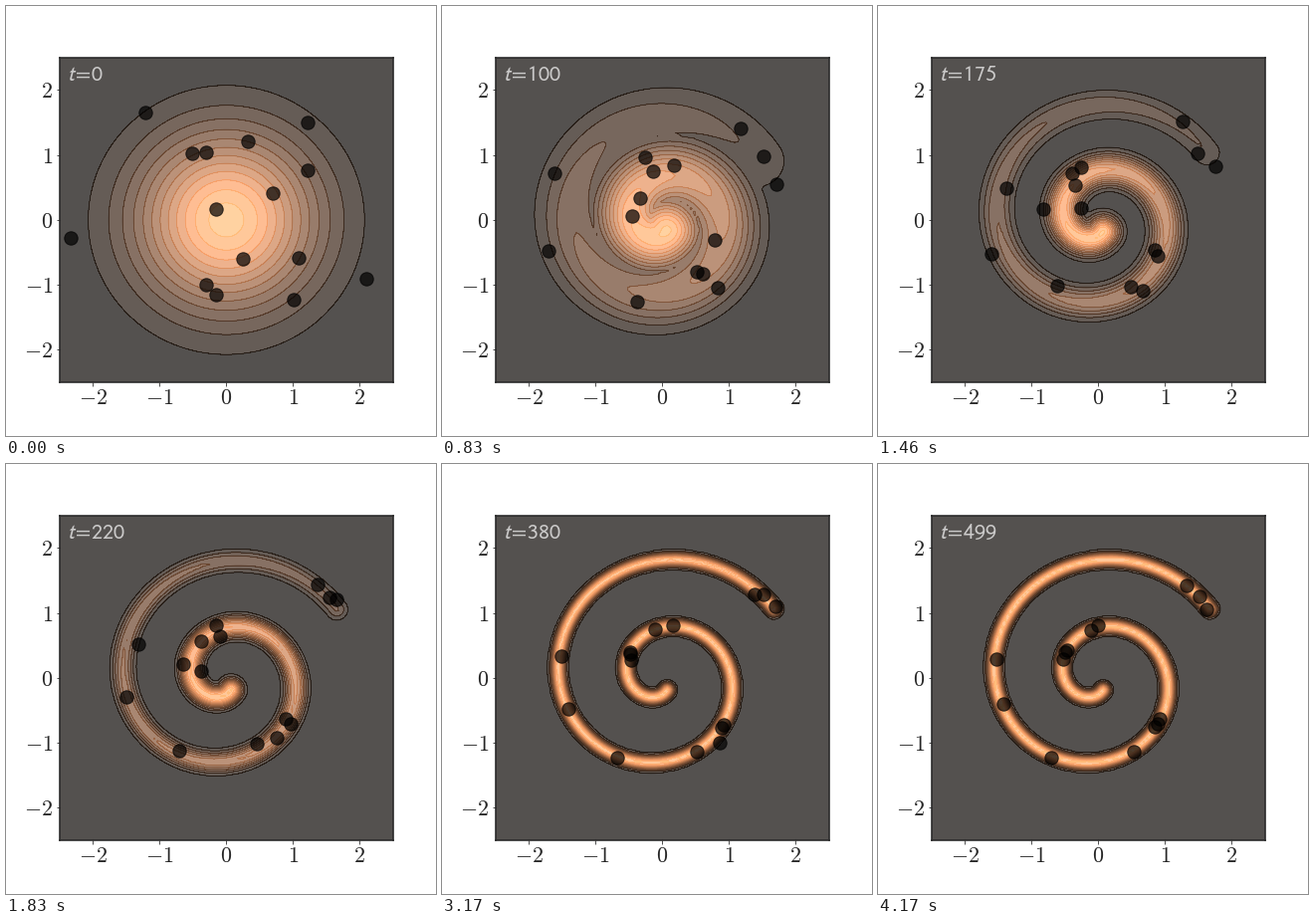
A matplotlib script that plays this animation: 432 by 432 pixels, repeating every 4.21 s.

```python
import numpy as np
import matplotlib.pyplot as plt
from matplotlib.animation import FuncAnimation

plt.rcParams["mathtext.fontset"] = "cm"

POSES, LOOP_MS = 101, 4210
SUBFRAMES = 2
STEPS = 500
INK = "0.15"
ALPHA = 0.7

# Spiral target and Gaussian prior
PITCH, PHI_MIN, PHI_MAX = 0.165, 1.2, 12.0
SHARPNESS = 105.0
PRIOR_VAR = 0.85

# Each walker: starting x, y and the spiral angle it settles at
WALKERS = np.array([
    (-1.21, 1.66, 9.65), (1.22, 1.50, 11.80), (0.33, 1.21, 4.76),
    (-0.52, 1.03, 3.90), (-0.30, 1.04, 4.59), (1.22, 0.76, 12.0),
    (0.69, 0.41, 6.91), (-0.15, 0.17, 3.70), (-2.33, -0.28, 9.13),
    (0.25, -0.60, 7.43), (1.09, -0.58, 7.00), (-0.31, -1.00, 3.80),
    (-0.15, -1.15, 8.39), (1.01, -1.23, 7.07), (2.10, -0.90, 11.84),
])


def spiral(phi):
    r = PITCH * phi
    return r * np.cos(phi), -r * np.sin(phi)


def mix(step):
    """Weight of the spiral against the prior."""
    return min(1, step / 50) / (1 + np.exp(5.9 - 0.025 * step))


def walk(rng):
    """Walker positions for every pose: a pull to the spiral plus cooling jitter."""
    start = WALKERS[:, :2]
    goal = np.column_stack(spiral(WALKERS[:, 2]))
    jitter = np.zeros_like(start)
    path = []
    for pose in range(POSES):
        step = 5 * pose
        pull = np.tanh(step / 130)
        path.append(start + (goal - start) * pull + jitter)
        heat = 0.02 + 0.06 * (1 - mix(step))
        jitter = 0.85 * jitter + rng.normal(0, heat, start.shape)
    return path


def spiral_dist2(x, y):
    best = np.full(x.shape, np.inf)
    for phi in np.linspace(PHI_MIN, PHI_MAX, 700):
        sx, sy = spiral(phi)
        np.minimum(best, (x - sx) ** 2 + (y - sy) ** 2, out=best)
    return best


axis = np.linspace(-2.5, 2.5, 100)
gx, gy = np.meshgrid(axis, axis)
prior = (gx**2 + gy**2) / (2 * PRIOR_VAR)
target = SHARPNESS * spiral_dist2(gx, gy)
path = walk(np.random.default_rng(4))

fig, ax = plt.subplots(figsize=(6, 6), dpi=72)
fig.subplots_adjust(left=0.125, right=0.9, bottom=0.125, top=0.88)
ticks = range(-2, 3)
labels = [f"${v}$" for v in ticks]
ax.set_xticks(ticks, labels)
ax.set_yticks(ticks, labels)
ax.tick_params(labelsize=22, color=INK, labelcolor=INK)
ax.tick_params(axis="x", pad=2.7)
for spine in ax.spines.values():
    spine.set(linewidth=1.6, edgecolor=INK)

dots = ax.scatter(*path[0].T, s=180, color="black", alpha=ALPHA, zorder=3)
label = ax.text(-2.4, 2.15, "", fontsize=22, color="white", alpha=ALPHA,
                zorder=4, math_fontfamily="stixsans")
layers = []
shown = None


def draw(frame):
    global shown
    pose = min((frame + 1) // SUBFRAMES, POSES - 1)
    if pose != shown:
        shown = pose
        step = min(5 * pose, STEPS - 1)
        while layers:
            layers.pop().remove()
        w = mix(step)
        density = np.exp(-(1 - w) * prior - w * target)
        style = dict(levels=14, cmap="copper", alpha=ALPHA)
        layers.append(ax.contourf(gx, gy, density, **style))
        layers.append(ax.contour(gx, gy, density, linewidths=0.7, **style))
        ax.set(xlim=(-2.5, 2.5), ylim=(-2.5, 2.5))
        dots.set_offsets(path[pose])
        label.set_text(rf"$\mathsf{{t\hspace{{-0.1}}=\hspace{{-0.1}}{step}}}$")
    return [*layers, dots, label]


frames = POSES * SUBFRAMES
anim = FuncAnimation(fig, draw, frames=frames, interval=LOOP_MS / frames,
                     repeat=True, repeat_delay=0, blit=False)
plt.show()
```
